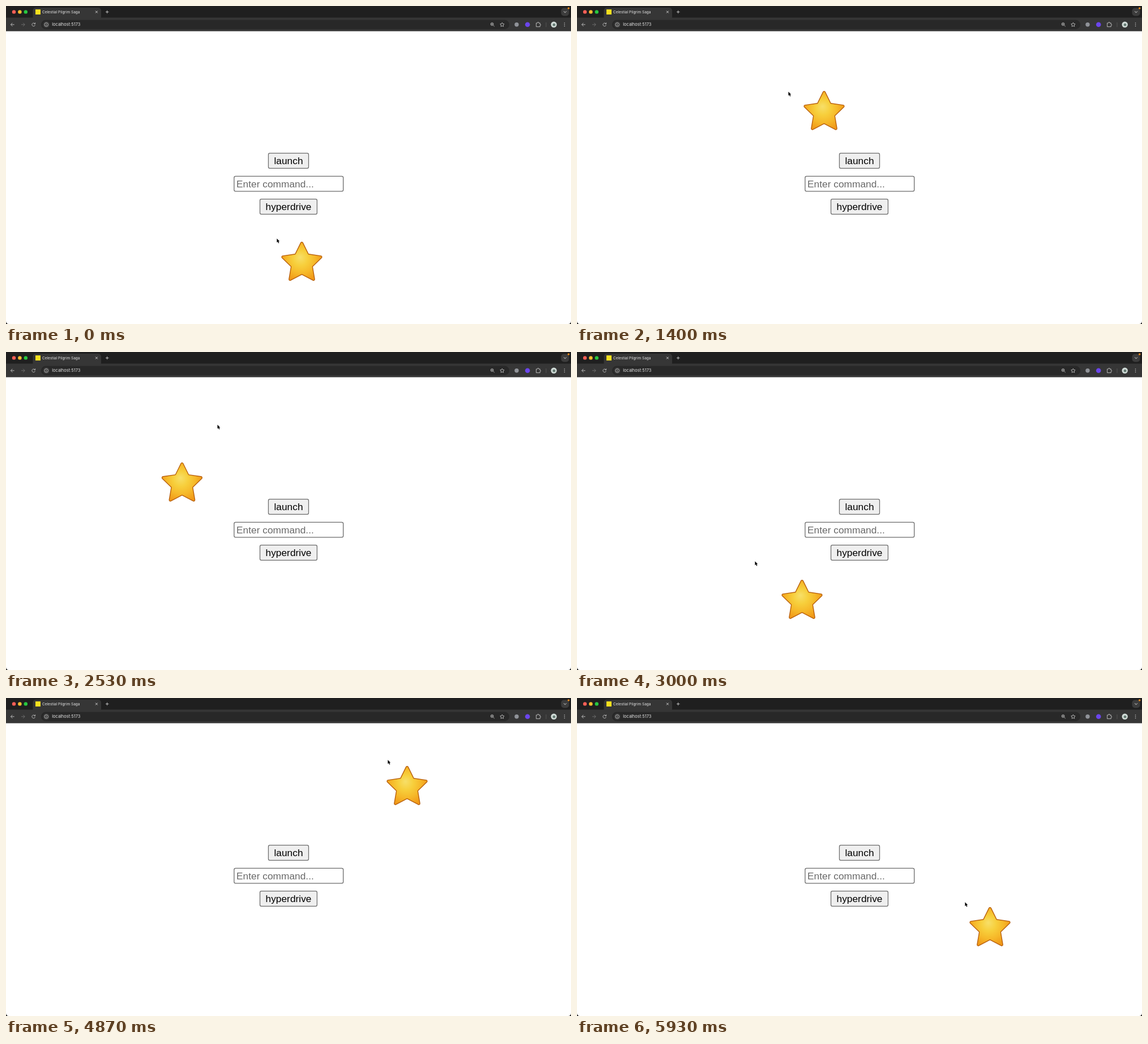
An HTML page with a canvas that plays this animation: 998x561 px, repeating every 6330 ms.

```html
<!DOCTYPE html>
<html lang="en">
<head>
<meta charset="utf-8">
<title>Star follower</title>
<style>
html, body { margin: 0; width: 100%; height: 100%; overflow: hidden; background: #fff; }
canvas { display: block; }
</style>
</head>
<body>
<canvas id="stage" width="998" height="561"></canvas>
<script>
const W = 998, H = 561, MID = 499, LOOP = 6330, STEP = 1000 / 15;
const ctx = document.getElementById('stage').getContext('2d');
const UI = 'Inter, Roboto, sans-serif';
const PAGE = '17.33px "Liberation Sans", Arial, sans-serif';
const INK = '#c8c8c8', EDGE = '#6b6b6b';

// Turning points of the hand-drawn loops: step, x, y
const turns = [
  [-1, 478, 407], [1, 478, 413], [6, 548, 361],
  [11, 548, 361], [13, 612, 290], [16, 534, 163],
  [18, 534, 163], [20, 392, 141], [21, 373, 151], [23, 340, 230], [25, 420, 375],
  [29, 578, 211], [30, 577, 189], [33, 420, 110], [36, 218, 217],
  [39, 480, 97], [41, 656, 175], [44, 353, 393], [45, 314, 369], [47, 225, 261], [50, 257, 178],
  [58, 257, 178], [61, 139, 111], [62, 123, 100], [65, 21, 78],
  [72, 664, 111], [73, 674, 109], [77, 902, 140], [86, 685, 360]
];

const slope = (i, axis) => {
  const a = turns[i], b = turns[i + 1];
  return a && b ? (b[axis] - a[axis]) / (b[0] - a[0]) : 0;
};

// Harmonic tangents: each axis eases to a stop where it turns or rests
const tangent = (i, axis) => {
  const a = slope(i - 1, axis), b = slope(i, axis);
  return a * b > 0 ? 2 * a * b / (a + b) : 0;
};

function pointer(step) {
  const end = turns.length - 1;
  step = Math.min(step, turns[end][0]);
  let i = 0;
  while (i < end - 1 && turns[i + 1][0] <= step) i++;
  const a = turns[i], b = turns[i + 1], span = b[0] - a[0];
  const u = (step - a[0]) / span, v = 1 - u;
  const at = axis =>
    a[axis] * (1 + 2 * u) * v * v + b[axis] * u * u * (3 - 2 * u) +
    span * u * v * (tangent(i, axis) * v - tangent(i + 1, axis) * u);
  return { x: at(1), y: at(2) };
}

function paint(fill, line, width) {
  if (fill) { ctx.fillStyle = fill; ctx.fill(); }
  if (line) { ctx.strokeStyle = line; ctx.lineWidth = width; ctx.stroke(); }
}

function box(x, y, w, h, r, fill, line, width) {
  ctx.beginPath();
  ctx.roundRect(x, y, w, h, r);
  paint(fill, line, width);
}

function disc(x, y, r, fill, line, width) {
  ctx.beginPath();
  ctx.arc(x, y, r, 0, 7);
  paint(fill, line, width);
}

function stroke(d, color = INK, width = 0.9) {
  ctx.strokeStyle = color;
  ctx.lineWidth = width;
  ctx.stroke(new Path2D(d));
}

function text(str, x, y, font, fill) {
  ctx.font = font;
  ctx.fillStyle = fill;
  ctx.fillText(str, x, y);
}

function at(x, y, scale, render) {
  ctx.save();
  ctx.translate(x, y);
  ctx.scale(scale, scale);
  render();
  ctx.restore();
}

function tabStrip() {
  box(0, 0, W, 21, 0, '#1f1f1f');
  ['#ff5f57', '#febc2e', '#28c840'].forEach((c, i) => disc(14 + 10.4 * i, 10.4, 3.2, c));
  box(47.5, 3, 120.5, 22, 5, '#363636');
  box(52, 6, 9, 9, 0, '#f7df1e');
  text('Celestial Pilgrim Saga', 64, 12.6, '6.5px ' + UI, '#e6e6e6');
  stroke('M158 8.6 l3.8 3.8 m0 -3.8 l-3.8 3.8', '#e0e0e0');
  stroke('M176 10.5 h5.4 m-2.7 -2.7 v5.4', '#d0d0d0');
  box(980.5, 3.5, 14, 14, 5, '#3c3c3c');
  stroke('M985.2 9.4 l2.3 2.3 l2.3 -2.3', '#e0e0e0', 1);
  disc(993.7, 4, 1.8, '#e8891c');
}

function toolbar() {
  const y = 32.8;
  box(0, 20.5, W, 24, 0, '#363636');
  box(62, 24.5, 827, 16.5, 8.25, '#282828');
  stroke(`M14.6 ${y} h-6 m2.8 -3 l-3 3 l3 3`);
  stroke(`M27 ${y} h6 m-2.8 -3 l3 3 l-3 3`, '#737373');
  stroke(`M51.4 ${y + 0.8} a2.8 2.8 0 1 1 -0.7 -2.7 m0.9 -1.6 v2.3 h-2.3`);
  disc(71.2, y, 5.8, '#3a3a3a');
  disc(71.2, y, 3.3, null, INK, 0.8);
  stroke(`M71.2 ${y - 0.4} v2.2 m0 -3.8 v0.9`, INK, 0.8);
  text('localhost:5173', 81.3, 35.3, '7.45px ' + UI, '#e6e6e6');

  disc(858.6, 32, 2.4, null, INK, 0.9);
  stroke('M860.4 33.8 l2.4 2.4 m-5.4 -4.2 h2.4 m-1.2 -1.2 v2.4', INK, 0.8);
  at(876.4, y, 0.1, () => { starShape(); paint(null, INK, 9); });
  disc(902, y, 3.7, '#909399');
  disc(921.2, y, 4.3, '#6b45ec');
  stroke('M936.6 30 h2.2 q0 -1.6 1.1 -1.6 t1.1 1.6 h2.2 v2.2 q1.4 0 1.4 1.1 t-1.4 1.1 v2.2 h-6.6 z');
  stroke('M954 29 v8.2', '#5a5a5a');
  disc(967.7, y, 5.2, '#cfdad6');
  disc(968, y + 0.4, 2.4, '#647a72');
  for (let i = -1; i < 2; i++) disc(986.5, y + 2.8 * i, 0.75, INK);
}

function button(label, y, mouse) {
  ctx.font = PAGE;
  const w = ctx.measureText(label).width + 20, x = MID - w / 2, h = 26.7;
  const over = Math.abs(mouse.x - MID) < w / 2 && mouse.y > y && mouse.y < y + h;
  box(x, y, w, h, 2.6, over ? '#e3e3e3' : '#efefef', over ? '#4f4f4f' : EDGE, 1.25);
  text(label, x + 10, y + 19.4, PAGE, '#000');
}

function page(mouse) {
  box(0, 0, W, H, 0, '#fff');
  button('launch', 259.6, mouse);
  box(402.9, 300.3, 192.8, 26.5, 2.6, '#fff', EDGE, 1.3);
  text('Enter command...', 407, 319.7, PAGE, '#686868');
  button('hyperdrive', 340.6, mouse);
}

function starShape() {
  const corner = i => {
    const r = i % 2 ? 19.8 : 39.7, a = i * Math.PI / 5;
    return [r * Math.sin(a), 2.5 - r * Math.cos(a)];
  };
  const [x0, y0] = corner(0), [x9, y9] = corner(9);
  ctx.beginPath();
  ctx.moveTo((x0 + x9) / 2, (y0 + y9) / 2);
  for (let i = 0; i < 10; i++) ctx.arcTo(...corner(i), ...corner(i + 1), i % 2 ? 0.6 : 2);
  ctx.closePath();
}

function star() {
  const glow = ctx.createRadialGradient(-3, -8, 1, -1, -3, 38);
  ['#f7de66', '#f7cf3c', '#f6b829', '#f09818'].forEach((c, i) => glow.addColorStop(i / 3, c));
  starShape();
  paint(glow, '#b9610f', 1.4);
}

function arrow() {
  const shape = new Path2D('M0.4 0.2 V7.2 L2 5.8 L3.1 8.4 L4.4 7.9 L3.3 5.3 H5.3 Z');
  ctx.lineJoin = 'round';
  ctx.strokeStyle = '#fff';
  ctx.lineWidth = 1.2;
  ctx.stroke(shape);
  ctx.fillStyle = '#000';
  ctx.fill(shape);
}

function corners() {
  ctx.fillStyle = '#000';
  ctx.fill(new Path2D(`M0 ${H} v-5 q0 5 5 5 z M${W} ${H} v-5 q0 5 -5 5 z`));
}

function draw(ms) {
  const step = Math.floor((ms % LOOP + 5) / STEP);
  const mouse = pointer(step), trail = pointer(step - 1);
  page(mouse);
  tabStrip();
  toolbar();
  at(trail.x + 44.5, trail.y + 44.2, 1, star);
  at(mouse.x, mouse.y, 1, arrow);
  corners();
}

const start = performance.now();
function tick() {
  draw(performance.now() - start);
  requestAnimationFrame(tick);
}
tick();
</script>
</body>
</html>
```
